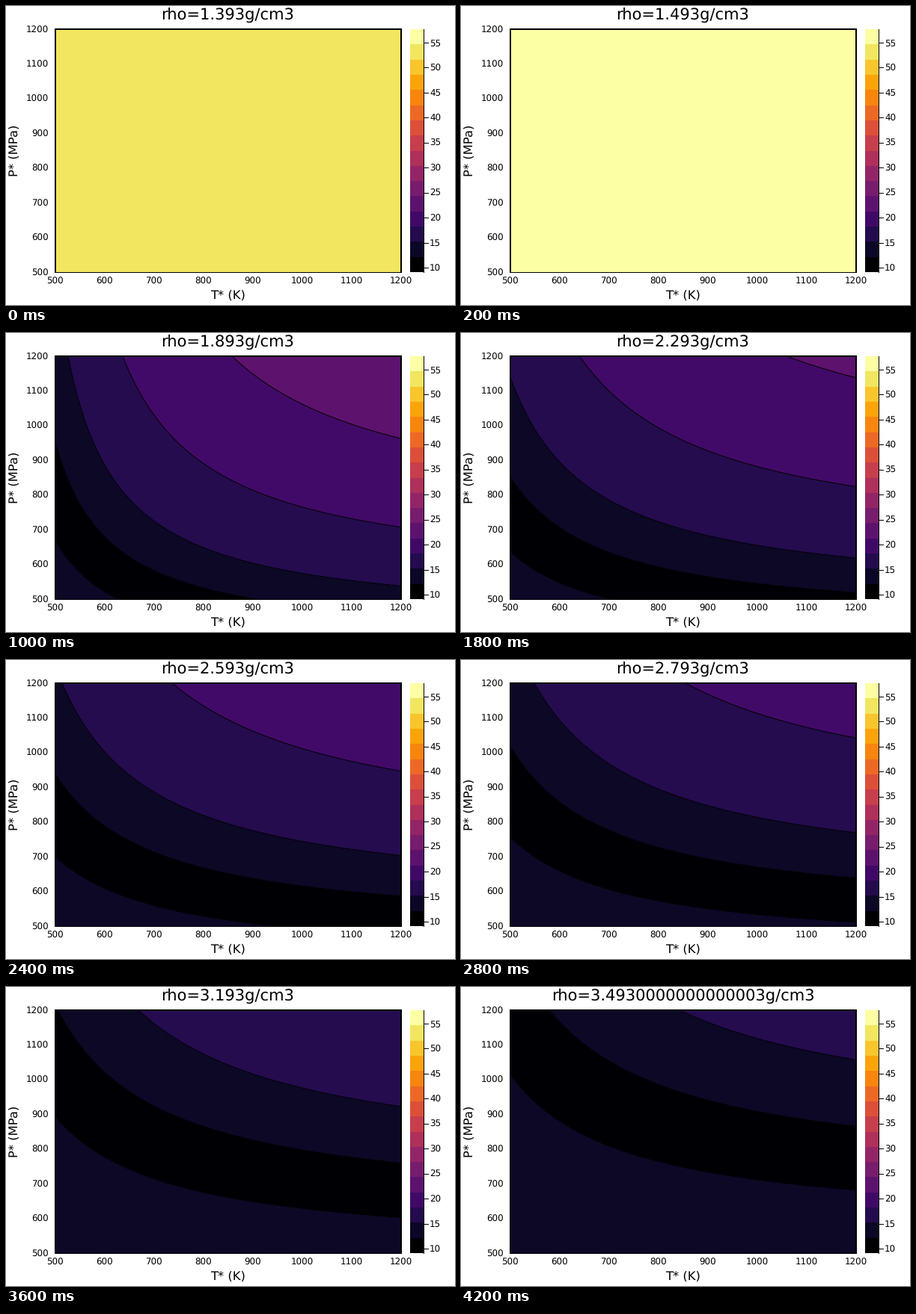
A matplotlib script for the animation above (4.4 s loop, 600 px wide and 400 px high).

```python
import numpy as np
import matplotlib.pyplot as plt
from matplotlib.animation import FuncAnimation

W, H, DPI = 600, 400, 100
STEPS, INTERVAL = 22, 200
LEFT, RIGHT, TOP, BOTTOM = 66, 528, 31, 356

LEVELS = np.linspace(9.1, 57.7, 17)
COLORS = plt.get_cmap("inferno")(np.linspace(0, 1, 16))
FAILED = 57.65  # error value where no solution exists

CURVE = np.arange(5)  # level curves from the lowest to the highest
GAPS = np.array([0, 0.2, 0.368, 0.642, 0.95])


def level_pressures(step, temp):
    """Pressures of the five level curves, each a hyperbola in temperature."""
    u = step - 9
    lowest = 420 + 15.8 * u + 0.5 * u * u + 31 * np.exp((3 - step) / 1.4)
    hot_end = lowest * np.exp(GAPS * (1 + 0.012 * (step - 5)))
    bend = 0.16 + 0.012 * CURVE + 0.003 * CURVE ** 2
    pole = (262 + 27 * CURVE + 1.2 * (step - 14)
            + 222 * (1 + 0.005 * CURVE ** 3) * np.exp((3 - step) / 2.8))
    return hot_end * (1 + bend * (1200 - temp) / np.maximum(temp - pole, 1))


def smooth_interp(x, xs, ys):
    """Cubic Hermite interpolation through the knots (xs, ys)."""
    slopes = np.gradient(ys, xs)
    i = np.clip(np.searchsorted(xs, x, "right") - 1, 0, len(xs) - 2)
    h = xs[i + 1] - xs[i]
    u = np.clip((x - xs[i]) / h, 0, 1)
    return ((1 + 2 * u) * (1 - u) ** 2 * ys[i]
            + u * (1 - u) ** 2 * h * slopes[i]
            + u * u * (3 - 2 * u) * ys[i + 1]
            + u * u * (u - 1) * h * slopes[i + 1])


def error_surface(step):
    axis = np.arange(500, 1201, 20 if step == 3 else 10)
    values = np.array([14.5, 13.5, LEVELS[1], 10.3, *LEVELS[1:5],
                       LEVELS[4] + 1.5])
    columns = []
    for temp in axis:
        a, b, c, d, e = level_pressures(step, temp)
        knots = np.array([a - 700, a - 100, a, (a + b) / 2, b, c, d, e, e + 600])
        columns.append(smooth_interp(axis, knots, values))
    z = np.column_stack(columns)
    if step == 3:
        temp, pressure = np.meshgrid(axis, axis)
        dt = temp - 560
        z[pressure >= 526.2 + 1.7 * dt + 0.00165 * dt ** 2] = FAILED
    return axis, z


def density_label(step):
    # the last sum shows its floating-point tail
    tail = "0000000000003" if step == STEPS - 1 else ""
    return f"rho={1.393 + 0.1 * step:.3f}{tail}g/cm3"


plt.rcParams["font.family"] = "DejaVu Sans"
plt.rcParams["text.hinting"] = "none"
fig = plt.figure(figsize=(W / DPI, H / DPI), dpi=DPI, facecolor="white")


def pixel_axes(x0, y0, x1, y1):
    return fig.add_axes([x0 / W, 1 - y1 / H, (x1 - x0) / W, (y1 - y0) / H])


def label(x, y, text, px, ha="center", **kw):
    return fig.text(x / W, 1 - y / H, text, fontsize=px * 72 / DPI,
                    ha=ha, va="baseline", **kw)


def pixel_line(xs, ys):
    fig.add_artist(plt.Line2D([x / W for x in xs], [1 - y / H for y in ys],
                              color="black", lw=0.72))


ax = pixel_axes(LEFT, TOP, RIGHT, BOTTOM)
ax.set(xlim=(500, 1200), ylim=(500, 1200), xticks=[], yticks=[])
for side, spine in ax.spines.items():
    spine.set_linewidth(0.72 if side == "bottom" else 1.44)
    spine.set_zorder(5)

TICK, NAME, TITLE = 11.9, 16.4, 20.95
for v in range(500, 1201, 100):
    f = (v - 500) / 700
    label(LEFT - 0.6 + f * (RIGHT - LEFT), 371.5, v, TICK)
    label(57.2, BOTTOM - f * (BOTTOM - TOP) + 4.4, v, TICK, ha="right")

label(296.7, 392, "T* (K)", NAME)
label(16, 193, "P* (MPa)", NAME, rotation=90, rotation_mode="anchor")
title = label(296.4, 18.3, "", TITLE)

bar = pixel_axes(540, TOP, 558, BOTTOM)
bar.imshow(COLORS[:, None, :], origin="lower", aspect="auto",
           interpolation="nearest", extent=(0, 1, LEVELS[0], LEVELS[-1]))
bar.axis("off")

BAR_EDGE = 557.9
pixel_line((BAR_EDGE, BAR_EDGE), (TOP, BOTTOM))
for v in range(10, 56, 5):
    y = BOTTOM - (v - LEVELS[0]) / (LEVELS[-1] - LEVELS[0]) * (BOTTOM - TOP)
    pixel_line((BAR_EDGE, 564), (y, y))
    label(566, y + 4.4, v, TICK, ha="left")

drawn = []


def update(step):
    while drawn:
        drawn.pop().remove()
    title.set_text(density_label(step))
    ax.set_facecolor(COLORS[14] if step == 0 else COLORS[15])
    if step >= 3:
        axis, z = error_surface(step)
        drawn.append(ax.contourf(axis, axis, z, levels=LEVELS, colors=COLORS))
        drawn.append(ax.contour(axis, axis, z, levels=LEVELS[1:-1],
                                colors="black", linewidths=0.75))
    return [title]


anim = FuncAnimation(fig, update, frames=STEPS, init_func=lambda: [title],
                     interval=INTERVAL, repeat=True, repeat_delay=0)
plt.show()
```
